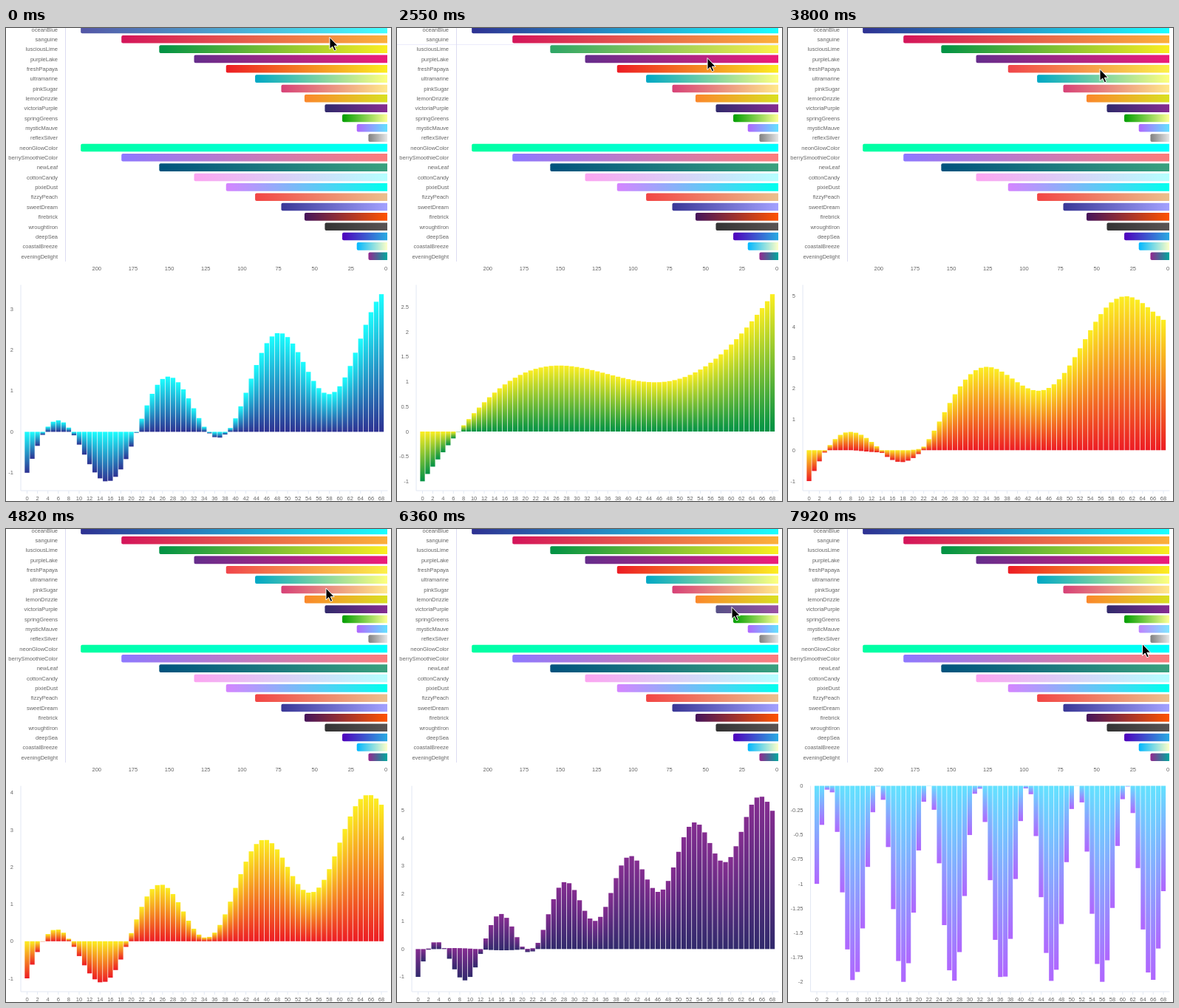
These frames come from a looping animation (521 px wide and 640 px high, 8000 ms). An HTML page:

```html
<!DOCTYPE html>
<html lang="en">
<head>
<meta charset="utf-8">
<title>Gradient charts</title>
<style>
html, body { margin: 0; width: 100%; height: 100%; overflow: hidden; background: #fff; }
svg { display: block; width: 521px; height: 640px; }
text { font: 7.5px "Liberation Sans", Arial, sans-serif; fill: #666; dominant-baseline: central; }
.mid { text-anchor: middle; }
.end { text-anchor: end; }
</style>
</head>
<body>
<svg id="stage" viewBox="0 0 521 640"></svg>
<script>
const LOOP = 8000, FADE = 600, COUNT = 69;
const TOP = 347.5, BOTTOM = 626, RIGHT = 516.5, LAST = 508;

const palettes = [
  ['oceanBlue', '#2e3192', '#1bffff'],
  ['sanguine', '#d4145a', '#fbb03b'],
  ['lusciousLime', '#009245', '#fcee21'],
  ['purpleLake', '#662d8c', '#ed1e79'],
  ['freshPapaya', '#ed1c24', '#fcee21'],
  ['ultramarine', '#00a8c5', '#ffff7e'],
  ['pinkSugar', '#d74177', '#ffe98a'],
  ['lemonDrizzle', '#fb872b', '#d9e021'],
  ['victoriaPurple', '#312a6c', '#852d91'],
  ['springGreens', '#009e00', '#ffff96'],
  ['mysticMauve', '#b066fe', '#63e2ff'],
  ['reflexSilver', '#808080', '#e6e6e6'],
  ['neonGlowColor', '#00ffa1', '#00ffff'],
  ['berrySmoothieColor', '#8e78ff', '#fc7d7b'],
  ['newLeaf', '#00537e', '#3aa17e'],
  ['cottonCandy', '#fca5f1', '#b5ffff'],
  ['pixieDust', '#d585ff', '#00ffee'],
  ['fizzyPeach', '#f24645', '#ebc08d'],
  ['sweetDream', '#3a3897', '#a3a1ff'],
  ['firebrick', '#45145a', '#ff5300'],
  ['wroughtIron', '#333333', '#5a5454'],
  ['deepSea', '#4f00bc', '#29abe2'],
  ['coastalBreeze', '#00b7ff', '#ffffc7'],
  ['eveningDelight', '#93278f', '#00a99d']
];

// start time, palette index, slope, frequency
const scenes = [
  [-FADE, 0, .0502, .2955],
  [200, 1, .08, .471],
  [1760, 2, .0601, .0875],
  [2910, 3, .0862, .2405],
  [3800, 4, .0605, .3146],
  [5350, 6, .0864, .5057],
  [6360, 8, .08, .27],
  [7300, 10, 0, .6457]
].map(([time, hue, slope, freq]) => {
  const values = Array.from({ length: COUNT }, (_, i) => slope * i - 1 + Math.sin(freq * i));
  const min = Math.min(...values), max = Math.max(...values);
  const pad = (max - min) * .05;
  const domain = max < .01 ? [min * 1.05, 0] : [min - pad, max + pad];
  const zero = scale(0, domain);
  const rects = values.map(v => {
    const y = scale(v, domain);
    return [Math.min(y, zero), Math.max(y, zero)];
  });
  return { time, hue, domain, rects };
});

// start, end, x, y
const moves = [
  [0, 0, 438, 12.5],
  [1060, 1290, 417, 25],
  [1760, 2380, 417, 42],
  [2550, 2550, 420, 40.5],
  [2910, 3410, 422, 55.5],
  [3800, 4230, 426.5, 67.5],
  [4650, 4820, 433, 80],
  [5350, 5940, 453, 105.5],
  [6360, 6950, 474, 134],
  [7300, 7920, 479.5, 155.5]
];

function scale(v, [lo, hi]) { return BOTTOM - (v - lo) / (hi - lo) * (BOTTOM - TOP); }
const mix = (a, b, p) => a + (b - a) * p;
const clamp = v => Math.max(0, Math.min(1, v));
const cubicOut = p => 1 - (1 - p) ** 3;

const stage = document.getElementById('stage');
function set(node, attrs) {
  for (const key in attrs) node.setAttribute(key, attrs[key]);
  return node;
}
function add(tag, attrs, parent = stage, content = '') {
  const node = set(document.createElementNS('http://www.w3.org/2000/svg', tag), attrs);
  node.textContent = content;
  return parent.appendChild(node);
}
const label = (x, y, cls, content = '') => add('text', { x, y, class: cls }, stage, content);
function gradient(id, dir, from, to) {
  const g = add('linearGradient', { id, x1: 0, y1: 0, x2: 0, y2: 0, ...dir }, defs);
  add('stop', { offset: 0, 'stop-color': from }, g);
  add('stop', { offset: 1, 'stop-color': to }, g);
}

const defs = add('defs', {});
const guide = add('path', { d: 'M0 22.5H517', stroke: '#ececfb' });
add('path', { d: 'M80.5 0V316', stroke: '#dcdcf2' });

const rows = palettes.map(([name, from, to], i) => {
  gradient('h' + i, { x2: 1 }, from, to);
  gradient('v' + i, { y1: 1 }, from, to);
  const n = 14 - i % 12, y = 1.9 + i * 13.34;
  const left = 516 - (n * (n + 1) + 1) * 1.966, top = y - 5.3;
  label(70, y + .3, 'end', name);
  return add('path', {
    d: `M516 ${top}V${top + 10.6}H${left + 2}q-2 0 -2 -2v-6.6q0 -2 2 -2z`,
    fill: `url(#h${i})`
  });
});
for (let v = 0; v <= 200; v += 25) label(v ? 516 - v * 1.966 : 514, 325.5, 'mid', v);

const axis = add('path', { stroke: '#e2e8f3', fill: 'none' });
const bars = Array.from({ length: COUNT }, () => add('rect', {}));
const xLabels = Array.from({ length: 35 }, (_, i) => label(0, 636, 'mid', i * 2));
const yLabels = Array.from({ length: 11 }, () => label(0, 0, 'end'));
const cursor = add('path', {
  d: 'M0 0V16L3.7 12.6L6.3 18.3L8.8 17.2L6.3 11.7H11.2Z',
  stroke: '#fff', 'stroke-width': 1, 'stroke-linejoin': 'round'
});

function drawChart(t) {
  let at = scenes.length - 1;
  while (scenes[at].time > t) at--;
  const now = scenes[at], old = scenes[Math.max(0, at - 1)];
  const p = cubicOut(clamp((t - now.time + 10) / FADE));
  const domain = now.domain.map((v, i) => mix(old.domain[i], v, p));
  const span = domain[1] - domain[0];
  const step = [.25, .5, 1].find(s => span / s <= 9) || 1;
  const left = step === 1 ? 20 : step === .5 ? 26 : 30.5;
  const first = left + 8.5, pitch = (LAST - first) / (COUNT - 1);

  bars.forEach((bar, i) => {
    const [y0, y1] = now.rects[i].map((v, j) => mix(old.rects[i][j], v, p));
    set(bar, {
      x: first + pitch * (i - .45), y: y0, width: pitch * .9,
      height: y1 - y0, fill: `url(#v${now.hue})`
    });
  });
  let d = `M${left} ${TOP}V${BOTTOM}H${RIGHT}`;
  xLabels.forEach((node, i) => {
    const x = first + pitch * i * 2;
    node.setAttribute('x', x);
    d += `M${x} ${BOTTOM}v4`;
  });
  axis.setAttribute('d', d);

  const low = Math.ceil(domain[0] / step - 1e-6);
  yLabels.forEach((node, i) => {
    const v = (low + i) * step;
    node.textContent = v <= domain[1] + 1e-6 ? String(v || 0) : '';
    set(node, { x: left - 10, y: scale(v, domain) });
  });
  rows.forEach((row, i) => row.setAttribute('opacity', i === now.hue ? .82 : 1));
  guide.setAttribute('opacity', now.hue === 2 ? 1 : 0);
}

function drawCursor(t) {
  let [, , x, y] = moves[0];
  for (const [start, end, tx, ty] of moves) {
    if (t < start) break;
    const p = end > start ? clamp((t - start) / (end - start)) : 1;
    x = mix(x, tx, p);
    y = mix(y, ty, p);
  }
  cursor.setAttribute('transform', `translate(${x} ${y})`);
}

const begin = performance.now();
function frame(time) {
  const t = Math.max(0, time - begin) % LOOP;
  drawChart(t);
  drawCursor(t);
  requestAnimationFrame(frame);
}
frame(begin);
</script>
</body>
</html>
```
